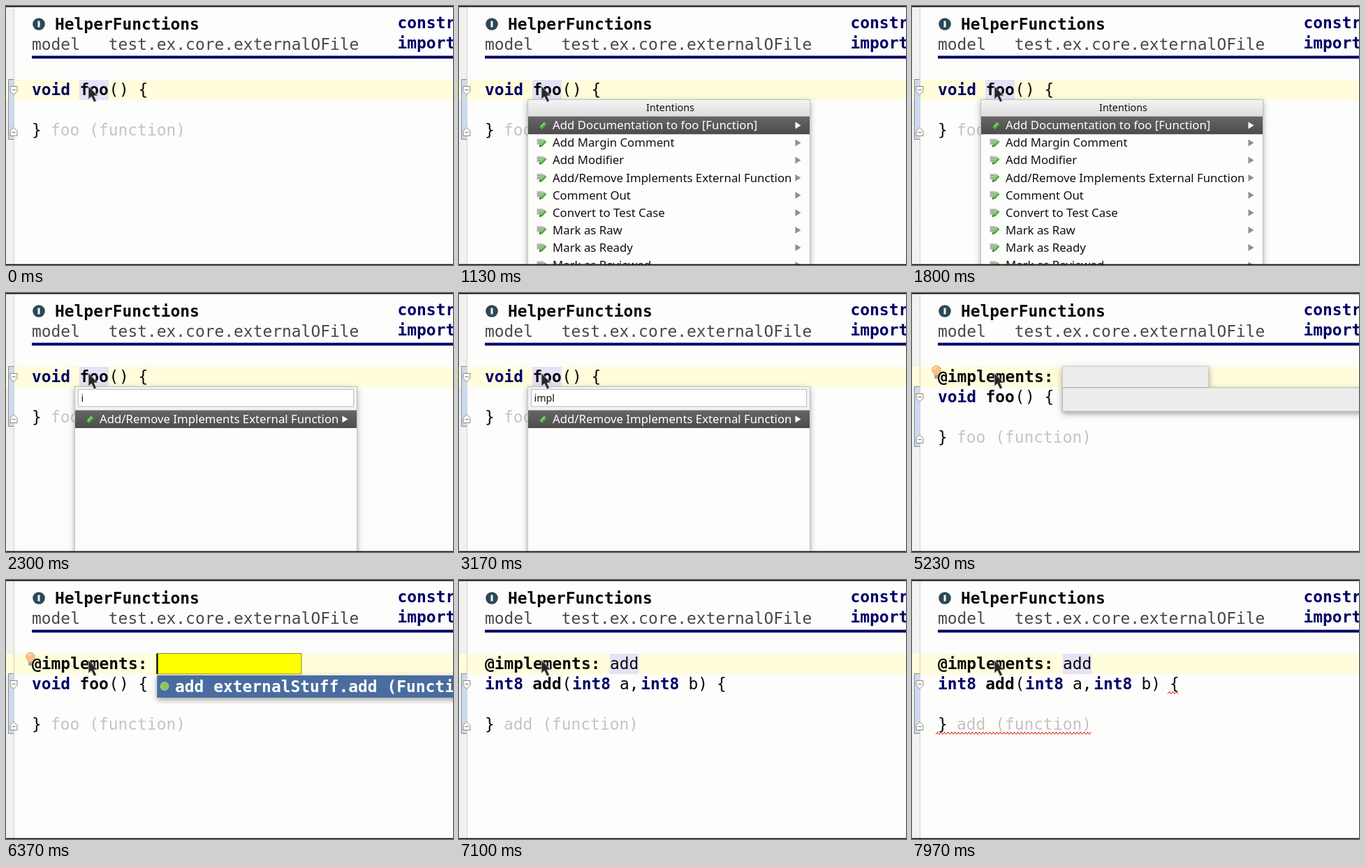
Recreate the animation shown at these times as an HTML page. Size 640 by 372 pixels, loop 8000 ms.

```html
<!DOCTYPE html>
<html lang="en">
<head>
<meta charset="utf-8">
<title>Implementing an external function</title>
<style>
html, body { margin: 0; width: 100%; height: 100%; overflow: hidden; background: #fdfdfc; }
svg { display: block; width: 640px; height: 372px; }
.code { font: 22.92px "DejaVu Sans Mono", monospace; }
.bold { font-weight: bold; }
.menu { font: 16.8px "Noto Sans", sans-serif; }
.small { font: 14.3px "Noto Sans", sans-serif; }
</style>
</head>
<body>
<svg id="stage" viewBox="0 0 640 372"></svg>
<script>
const LOOP = 8000;
const T = {
  menu: 1030, typing: [1830, 2570, 2700, 2870], pick: 3430, bulb: 4400,
  popup: 5200, list: 5270, accept: 6630, errors: 7370
};
const ITEMS = ["Add Documentation to foo [Function]", "Add Margin Comment", "Add Modifier",
  "Add/Remove Implements External Function", "Comment Out", "Convert to Test Case",
  "Mark as Raw", "Mark as Ready", "Mark as Reviewed"];
const PAGE = "#fdfdfc", NAVY = "#000068", INK = "#080808", GREY = "#484848", FAINT = "#c4c4c4";
const SELECTED = "#e5e1f6", BLUE = "#4a6d9f";
const QUERY = "impl";

const stage = document.getElementById("stage");

function add(parent, tag, attrs, text) {
  const el = document.createElementNS("http://www.w3.org/2000/svg", tag);
  for (const k in attrs) el.setAttribute(k, attrs[k]);
  if (text !== undefined) el.textContent = text;
  parent.appendChild(el);
  return el;
}
const group = (parent = stage, attrs = {}) => add(parent, "g", attrs);
const rect = (p, x, y, width, height, fill, more) =>
  add(p, "rect", { x, y, width, height, fill, ...more });
const path = (p, d, fill, more) => add(p, "path", { d, fill, ...more });
const label = (p, x, y, s, fill, cls, more) =>
  add(p, "text", { x, y, fill, class: cls, ...more }, s);
const code = (p, x, y, s, fill = INK, bold = false) =>
  label(p, x, y, s, fill, bold ? "code bold" : "code");
const show = (el, on) => el.setAttribute("display", on ? "inline" : "none");

// Shadow and gradients
const defs = add(stage, "defs");
const blur = add(defs, "filter", { id: "shadow", x: "-20%", y: "-20%", width: "140%", height: "150%" });
add(blur, "feDropShadow", { dx: 0, dy: 3, stdDeviation: 4, "flood-color": "#404040", "flood-opacity": 0.5 });
function gradient(id, top, bottom) {
  const g = add(defs, "linearGradient", { id, x1: 0, y1: 0, x2: 0, y2: 1 });
  add(g, "stop", { offset: 0, "stop-color": top });
  add(g, "stop", { offset: 1, "stop-color": bottom });
}
gradient("title", "#f4f4f4", "#dcdcdc");
gradient("chosen", "#666666", "#4c4c4c");

// Page and current line
rect(stage, 0, 0, 640, 372, PAGE);
rect(stage, 0, 0, 11, 372, "#f1f1ef");
rect(stage, 0, 106, 640, 29.5, "#fffddb");
path(stage, "M11.5 2V371", "none", { stroke: "#a4a4a4", "stroke-dasharray": "1 1" });

// Header
add(stage, "circle", { cx: 47, cy: 26, r: 8.8, fill: "#2c4858" });
path(stage, "M47 21.5V30.5", "none", { stroke: "#f4f8f8", "stroke-width": 3 });
code(stage, 70, 34, "HelperFunctions", INK, true);
code(stage, 37, 63, "model", GREY);
code(stage, 146.8, 63, "test.ex.core.externalOFile", GREY);
code(stage, 560.5, 32, "constraints", NAVY, true);
code(stage, 560.5, 61, "import", NAVY, true);
rect(stage, 37, 71.5, 603, 4, NAVY);

// Function block with its fold bracket
const fooSelection = rect(stage, 105, 106, 42, 29, SELECTED);
const block = group();
rect(block, 4, 105.5, 7, 86, "#ccdaf2");
path(block, "M11 105.5H3.5V191.5H11", "none", { stroke: "#8c8c8c" });
for (const d of ["M6 115.5H16V122.5L11 127.5L6 122.5Z", "M6 186.5H16V179.5L11 174.5L6 179.5Z"])
  path(block, d, "#fafaf4", { stroke: "#8a8a86" });
path(block, "M8.5 120.5H13.5M8.5 181.5H13.5", "none", { stroke: "#707070" });
code(block, 37, 186, "}");
code(block, 147.6, 128, "(");

const oldFn = group(block);
code(oldFn, 37, 128, "void", NAVY, true);
code(oldFn, 105.5, 128, "foo", INK, true);
code(oldFn, 162, 128, ") {");
code(oldFn, 64, 186, "foo (function)", FAINT);

const newFn = group(block);
code(newFn, 37, 128, "int8", NAVY, true);
code(newFn, 105.3, 128, "add", INK, true);
code(newFn, 162, 128, "int8", NAVY, true);
code(newFn, 230, 128, "a,");
code(newFn, 260.2, 128, "int8", NAVY, true);
code(newFn, 328.4, 128, "b)");
code(newFn, 369, 128, "{");
code(newFn, 64, 186, "add (function)", FAINT);

// Wavy error underline
function wave(p, x, y, end) {
  let d = `M${x} ${y + 1.5}`;
  for (let i = 1; x + i * 2.5 <= end; i++) d += `L${x + i * 2.5} ${y + (i % 2 ? -1.5 : 1.5)}`;
  path(p, d, "none", { stroke: "#e5402c", "stroke-width": 1.1 });
}
const errors = group();
wave(errors, 366, 162, 383);
wave(errors, 34, 220, 258);

const bulb = group();
path(bulb, "M32 118C32 115 28.5 114 28.5 110.5A6.5 6.2 0 0 1 41.5 110.5C41.5 114 38 115 38 118Z",
  "#f6c486", { stroke: "#dda865", "stroke-width": 0.8 });
rect(bulb, 32, 118, 6, 5, "#a8a29a", { rx: 1.5 });
path(bulb, "M32.5 109Q33 106.5 35.5 106.5", "none", { stroke: "#ffeccc", "stroke-width": 1.5 });

// Annotation line
const annotation = group();
code(annotation, 37, 128, "@implements:", INK, true);
const missing = group(annotation);
rect(missing, 216, 106, 207, 29, "#ffd6c4");
code(missing, 216, 128, "<no implements>", "#f00808");
const resolved = group(annotation);
rect(resolved, 216, 106, 41, 29, SELECTED);
code(resolved, 216, 128, "add");

// Intentions menu
function pencil(p, y, paper) {
  if (paper) {
    path(p, `M111.5 ${y - 6}H121L115 ${y + 3}H111.5Z`, "#c2c2c2");
    path(p, `M112 ${y - 3}H119M112 ${y}H117`, "none", { stroke: "#8e8e8e" });
  }
  path(p, `M115 ${y + 6}L115.8 ${y + 1.5}L121.5 ${y - 5}L125.5 ${y - 1.5}L119.5 ${y + 5}Z`, "#4cae3c");
  path(p, `M117.3 ${y + 2.2}L122.8 ${y - 3.6}`, "none", { stroke: "#a4e18c", "stroke-width": 1.4 });
  path(p, `M115 ${y + 6}L115.5 ${y + 3}L117.8 ${y + 5.3}Z`, "#444444");
}
function menuRow(p, y, s, chosen) {
  if (chosen) rect(p, 99, y - 12.8, 403, 25.6, "url(#chosen)");
  pencil(p, y, !chosen);
  label(p, 134, y + 5.8, s, chosen ? "#ffffff" : "#101010", "menu");
  path(p, `M481.5 ${y - 5}L489.5 ${y}L481.5 ${y + 5}Z`, chosen ? "#ffffff" : "#8e8e8e");
}
const menu = group();
rect(menu, 98.5, 134.5, 404, 260, PAGE, { filter: "url(#shadow)" });
rect(menu, 98.5, 134.5, 404, 260, PAGE, { stroke: "#b4b4b4", "stroke-width": 0.8 });
const fullList = group(menu);
rect(fullList, 99, 135, 403, 24, "url(#title)");
label(fullList, 302.5, 151, "Intentions", "#101010", "small", { "text-anchor": "middle" });
ITEMS.forEach((s, i) => menuRow(fullList, 171.4 + i * 25.1, s, i === 0));
const search = group(menu);
rect(search, 99, 135, 403, 33, "#f2f2f2");
rect(search, 103.5, 138.5, 394, 24.5, "#ffffff", { stroke: "#bcbcbc" });
const query = label(search, 107.5, 156, "", "#101010", "small");
menuRow(search, 181.2, ITEMS[3], true);

// Completion popup: blank for a moment, then filled
const blank = group(stage, { filter: "url(#shadow)" });
rect(blank, 215.5, 105.5, 209, 30, "#ededed", { stroke: "#c8c8c8", "stroke-width": 0.8 });
rect(blank, 215.5, 136, 440, 34, "#ededed", { stroke: "#a8a8a8", "stroke-width": 0.8 });
const completion = group();
rect(completion, 216.5, 137, 440, 32, BLUE, { filter: "url(#shadow)" });
rect(completion, 215.5, 105.5, 207.5, 29.5, "#ffff00", { stroke: "#8c8c3c" });
rect(completion, 215.5, 106, 2.2, 29, "#101010");
rect(completion, 216.5, 137, 440, 32, BLUE);
add(completion, "circle", { cx: 227, cy: 152.5, r: 5.8, fill: "#8fc45c", stroke: "#bfdd9b" });
code(completion, 242, 161, "add externalStuff.add (Function", "#ffffff", true);

// Mouse pointer and screen edges
path(stage, "M118 115V134L122.3 130.2L126 138L129.5 136.4L126 129H131.5Z", "#262626",
  { stroke: "#cfcfcf", "stroke-width": 0.9 });
rect(stage, 0, 0, 640, 1.5, "#101010");
rect(stage, 0, 370.7, 640, 1.3, "#101010");

function draw(t) {
  const within = (a, b) => t >= a && t < b;
  const picked = t >= T.pick, accepted = t >= T.accept;
  const typed = T.typing.filter(at => t >= at).length;

  block.setAttribute("transform", `translate(0 ${picked ? 29 : 0})`);
  show(fooSelection, !picked);
  show(oldFn, !accepted);
  show(newFn, accepted);
  show(errors, t >= T.errors);
  show(annotation, picked);
  show(missing, t < T.popup);
  show(resolved, accepted);
  show(bulb, within(T.bulb, T.accept));
  show(menu, within(T.menu, T.pick));
  show(fullList, typed === 0);
  show(search, typed > 0);
  query.textContent = QUERY.slice(0, typed);
  show(blank, within(T.popup, T.list));
  show(completion, within(T.list, T.accept));
}

const start = performance.now();
function tick() {
  draw((performance.now() - start) % LOOP);
  requestAnimationFrame(tick);
}
draw(0);
requestAnimationFrame(tick);
</script>
</body>
</html>
```
